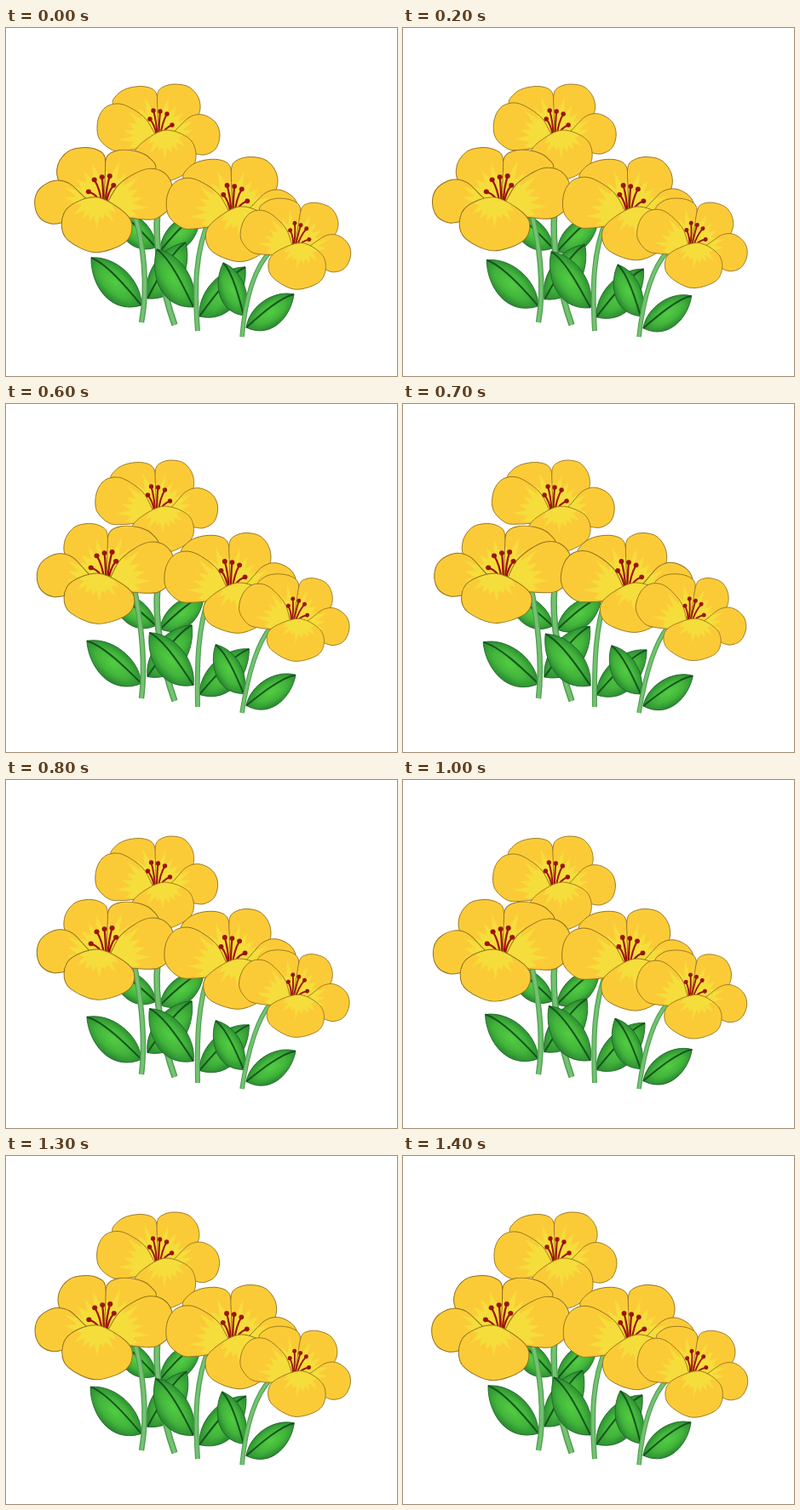
These frames come from a looping animation (459 px wide and 409 px high, 1.5 s). An HTML page:

```html
<!DOCTYPE html>
<html lang="en">
<head>
<meta charset="utf-8">
<title>Swaying yellow flowers</title>
<style>
html, body { margin: 0; width: 100%; height: 100%; overflow: hidden; background: #fff; }
svg { display: block; width: 100vw; height: 100vh; }
</style>
</head>
<body>
<svg id="stage" viewBox="0 0 459 409">
  <defs>
    <radialGradient id="green" cx=".5" cy=".52" r=".58">
      <stop offset="0" stop-color="#52cd42"/>
      <stop offset=".5" stop-color="#42b43b"/>
      <stop offset="1" stop-color="#217a2d"/>
    </radialGradient>
    <g id="flower"></g>
  </defs>
</svg>
<script>
const NS = 'http://www.w3.org/2000/svg';
const stage = document.getElementById('stage');
const defs = stage.querySelector('defs');
const bloom = document.getElementById('flower');
const movers = [];   // functions of the sway amount

function add(parent, tag, attrs) {
  const node = document.createElementNS(NS, tag);
  for (const key in attrs) node.setAttribute(key, attrs[key]);
  return parent.appendChild(node);
}

// Smooth curve through the points; an open one has a corner at its first point.
function smooth(pts, round) {
  const n = pts.length;
  const at = i => round ? pts[(i + n) % n] : pts[Math.max(0, Math.min(n - 1, i))];
  let d = 'M' + pts[0];
  for (let i = 0; i < (round ? n : n - 1); i++) {
    const [a, b, c, e] = [at(i - 1), at(i), at(i + 1), at(i + 2)];
    const p = k => b[k] + (c[k] - a[k]) / 6;
    const q = k => c[k] - (e[k] - b[k]) / 6;
    d += `C${p(0)},${p(1)} ${q(0)},${q(1)} ${c}`;
  }
  return d + 'Z';
}

function rays(x, y, axis, spread, rx, ry, count) {
  let d = `M${x},${y}`;
  for (let i = 0; i <= count * 2; i++) {
    const a = axis + spread * (i / count - 1);
    const r = i % 2 ? 0.88 + 0.14 * Math.sin(i * 5) : 0.6;
    d += `L${x + rx * r * Math.cos(a)},${y + ry * r * Math.sin(a)}`;
  }
  return d + 'Z';
}

// Points lie around the flower's heart; turn and squeeze are the full sway.
function petal(id, text, { turn = 0, squeezeX = 0, squeezeY = 0, round = false }) {
  const pts = text.split(' ').map(p => p.split(',').map(Number));
  const d = smooth(pts, round);
  const range = k => {
    const v = pts.map(p => p[k]), lo = Math.min(...v), hi = Math.max(...v);
    return [(lo + hi) / 2, hi - lo];
  };
  const [[x, w], [y, h]] = [range(0), range(1)];
  const [ox, oy] = pts[0];
  const reach = Math.hypot(x - ox, y - oy) * 1.25;
  const fan = round
    ? rays(x, y - h / 2, Math.PI / 2, 1.45, w * 0.4, h * 0.57, 9)
    : rays(ox, oy, Math.atan2(y - oy, x - ox), 0.8, reach, reach, 6);

  add(add(defs, 'clipPath', { id }), 'path', { d });
  const g = add(bloom, 'g', {});
  add(g, 'path', { d, fill: '#fbcb37' });
  add(g, 'path', { d: fan, fill: '#f5dd3b', 'clip-path': `url(#${id})` });
  add(g, 'path', {
    d, fill: 'none', stroke: '#92701f', 'stroke-width': 0.9, 'stroke-linejoin': 'round'
  });
  movers.push(s => g.setAttribute('transform',
    `rotate(${turn * s}) scale(${1 - squeezeX * s} ${1 - squeezeY * s})`));
}

function stamen(x, y) {
  add(bloom, 'path', {
    d: `M${x * 0.25},4Q${x * 0.4},${y * 0.5} ${x},${y}`,
    fill: 'none', stroke: '#9c140c', 'stroke-width': 2
  });
  add(bloom, 'circle', { cx: x, cy: y, r: 2.7, fill: '#9c140c' });
}

// One flower, reused for all four
petal('upperLeft', '0,6 -28,-6 -53,-31 -47,-45 -33,-52 -15,-53 -3,-46 0,-25', {});
petal('upperRight', '0,6 -1,-22 -1,-45 6,-53 20,-56 37,-52 48,-37 46,-18 24,7', { squeezeX: 0.1 });
petal('right', '5,7 18,0 36,-17 52,-20 67,-11 72,4 67,20 54,27 41,25', { turn: -3.5 });
petal('left', '-2,7 -14,-14 -29,-26 -46,-33 -62,-29 -71,-14 -70,7 -55,21 -39,22 -12,18', { turn: 3.5 });
stamen(-6, -25);
stamen(-10, -15);
stamen(2, -24);
stamen(10, -21);
stamen(16, -8);
petal('lower', '-29,27 -17,11 9,-2 36,8 44,27 37,45 9,58 -22,47', { squeezeY: 0.085, round: true });
movers.push(s => bloom.setAttribute('transform', `translate(${-2.5 * s} 0)`));

function flower(x, y, sx, sy, tilt = 0) {
  add(stage, 'use', {
    href: '#flower', transform: `translate(${x} ${y}) rotate(${tilt}) scale(${sx} ${sy})`
  });
}

// A leaf is drawn along its axis, narrow on the upper side, and leans outwards.
function leaf(tipX, tipY, x, y, turn) {
  const len = Math.hypot(tipX - x, tipY - y);
  const angle = Math.atan2(tipY - y, tipX - x) * 180 / Math.PI;
  const side = tipX < x ? 1 : -1;
  const blade = (near, far) =>
    `C${0.25 * len},${near * len} ${0.76 * len},${far * len} ${len},0`;
  const g = add(stage, 'g', {});
  add(g, 'path', {
    d: `M0,0${blade(0.27, 0.27)}M0,0${blade(-0.43, -0.27)}`,
    fill: 'url(#green)', stroke: '#1f6428', 'stroke-width': 0.8
  });
  add(g, 'path', {
    d: `M0,0${blade(0.03, 0.1)}`, fill: 'none', stroke: '#14541c', 'stroke-width': 2
  });
  movers.push(s => g.setAttribute('transform',
    `translate(${x} ${y + 2.5 * s}) rotate(${angle - side * turn * s}) scale(1 ${side})`));
}

// The middle of a stem bends while its foot stands still.
function stem([x, y], [ax, ay], [bx, by], foot, bend, width) {
  const lines = [['#4f9f50', width], ['#74c272', width * 0.6]].map(([stroke, w]) =>
    add(stage, 'path', { fill: 'none', stroke, 'stroke-width': w }));
  movers.push(s => {
    const d = `M${x},${y}C${ax + bend * s},${ay} ${bx + bend * s},${by} ${foot}`;
    lines.forEach(line => line.setAttribute('d', d));
  });
}

leaf(128, 215, 176, 258, 6);
leaf(228, 218, 181, 262, 6);
leaf(211, 252, 166, 318, 6.5);
stem([178, 215], [174, 255], [184, 310], [198, 349], 0, 7.5);
leaf(100, 270, 159, 326, 5.5);
stem([151, 218], [160, 250], [168, 300], [159, 346], -3, 6.5);
leaf(177, 260, 220, 328, 7.5);
leaf(281, 281, 227, 339, 4.5);
stem([239, 225], [222, 262], [221, 305], [225, 356], 3, 6);
leaf(255, 276, 279, 338, 8.5);
stem([311, 262], [291, 282], [281, 318], [277, 363], 3, 5.5);
leaf(338, 313, 282, 352, 3);

flower(179, 122, 1, 1);
flower(115, 201, -1.13, 1.08);
flower(266, 212, 1.08, 1.08);
flower(340, 253, 0.92, 0.92, 11);

// Ten poses a second: seven steps out, seven steps back
function draw(ms) {
  const step = Math.floor((ms % 1500) / 100);
  const sway = Math.min(step, 14 - step) / 6;
  movers.forEach(move => move(sway));
}

const start = performance.now();
function tick() {
  draw(performance.now() - start);
  requestAnimationFrame(tick);
}
draw(0);
requestAnimationFrame(tick);
</script>
</body>
</html>
```
